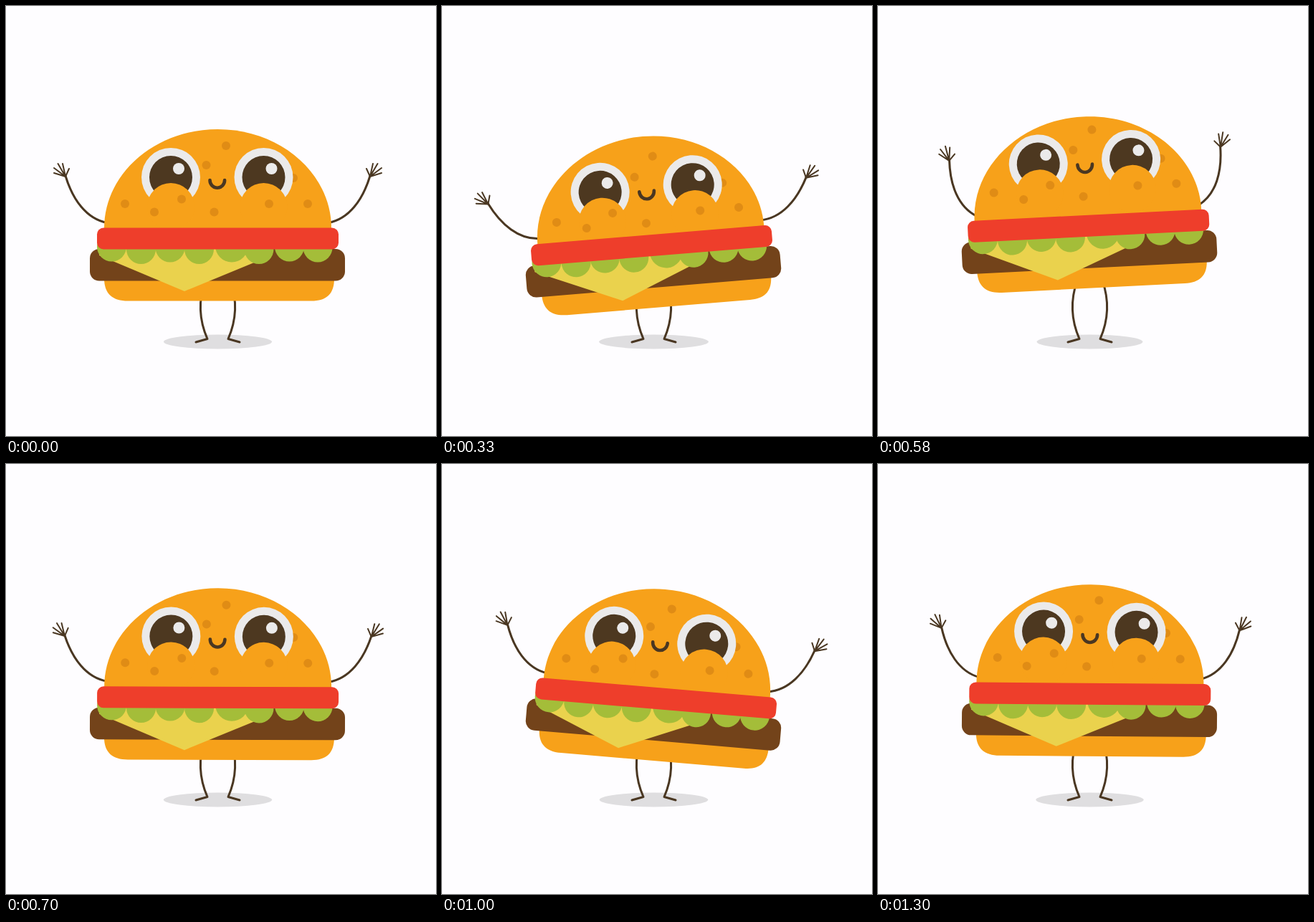
Write an HTML page that moves like this. It is 600 px wide and 600 px high and loops after 1330 ms.

```html
<!DOCTYPE html>
<html lang="en">
<head>
<meta charset="utf-8">
<title>Dancing burger</title>
<style>
  html, body { margin: 0; width: 100%; height: 100%; overflow: hidden; background: #fefdff; }
  svg { display: block; width: 100%; height: 100%; }
  .bun { fill: #f7a11a; }
  .seed { fill: #e08c15; }
  .white { fill: #ebeaea; }
  .dark { fill: #4d3820; }
  .line { fill: none; stroke: #4a3722; stroke-width: 3; stroke-linecap: round; stroke-linejoin: round; }
  .fingers { stroke-width: 2; }
  .lettuce { fill: #a4bd39; }
</style>
</head>
<body>
<svg viewBox="0 0 600 600">
  <defs>
    <g id="limb" class="line">
      <path d="M141 302.5C112 297 93 270 83 237"/>
      <path class="fingers" d="M67 233L83 238L67 226M72.5 220L83 238L79 220M83 238L88 227"/>
    </g>
    <path id="leg" class="line" d="M278 383C268 411 269 437 281 464.5L265 469"/>
    <g id="eye">
      <circle class="white" r="41"/>
      <circle class="dark" r="30"/>
      <circle class="white" cx="11" cy="-12" r="8"/>
      <circle class="bun" cy="41" r="33"/>
    </g>
  </defs>

  <ellipse id="shadow" cx="295.5" cy="468.5" rx="75.5" ry="10" fill="#dfdee0"/>
  <use href="#leg"/>
  <use href="#leg" transform="translate(591) scale(-1 1)"/>

  <g id="body">
    <g id="armL"><use href="#limb"/></g>
    <g transform="translate(591) scale(-1 1)"><g id="armR"><use href="#limb"/></g></g>

    <path class="bun" d="M137 312V310C137 234 208 172 295.5 172S454 234 454 310V312Z"/>
    <g id="face">
      <g class="seed">
        <circle cx="195" cy="240" r="6"/>
        <circle cx="401" cy="240" r="6"/>
      </g>
      <use href="#eye" x="230" y="239"/>
      <use href="#eye" x="359.5" y="239"/>
      <g class="seed">
        <circle cx="307" cy="195" r="6"/>
        <circle cx="279.5" cy="222" r="6"/>
        <circle cx="245" cy="269.5" r="6"/>
        <circle cx="207" cy="287.5" r="6"/>
        <circle cx="166" cy="276" r="6"/>
        <circle cx="290.5" cy="287.5" r="6"/>
        <circle cx="367" cy="276" r="6"/>
        <circle cx="421" cy="276" r="6"/>
      </g>
      <path class="line" style="stroke-width:4.6" d="M284.5 243a10.3 10.8 0 0 0 20.6 0"/>
    </g>

    <path class="bun" d="M137 380C137 402 149 411.5 170 411.5H426C447 411.5 458 402 458 380Z"/>
    <rect x="117" y="339" width="356" height="44.5" rx="13" fill="#73431a"/>
    <path fill="#ead24d" d="M130 335V348L249 398L368 349L372 335Z"/>
    <g class="lettuce">
      <circle cx="147.5" cy="336" r="20.5"/>
      <circle cx="188.5" cy="339.5" r="20.5"/>
      <circle cx="229" cy="337" r="20.5"/>
      <circle cx="269.5" cy="339.5" r="20.5"/>
      <circle cx="315" cy="334.5" r="23"/>
      <circle cx="353" cy="339.5" r="20.5"/>
      <circle cx="395.5" cy="336" r="20.5"/>
      <circle cx="435" cy="337" r="20.5"/>
    </g>
    <rect x="127" y="309.5" width="337" height="30" rx="9" fill="#ee3e2b"/>
  </g>
</svg>
<script>
  const LOOP = 1330;
  const BLOCKS = [-210, 120, 460, 790, 1120];
  const [body, face, armL, armR, shadow] =
    ['body', 'face', 'armL', 'armR', 'shadow'].map(id => document.getElementById(id));

  // Ten drawings per block; the first of each is held twice as long.
  function drawing(t) {
    const block = BLOCKS.findLastIndex(start => t >= start);
    const slot = Math.floor((t - BLOCKS[block]) / 30) - 1;
    return block * 10 - 6 + Math.min(9, Math.max(0, slot));
  }

  // Slow start, then a steady pace: one sway holds two bounces.
  const turns = n => Math.max(n / 150, (n - 2) / 37.6);

  // A wave that trails a little behind the beat.
  const wave = (angle, size, lag) => size * Math.sin(angle) + lag * (1 - Math.cos(angle));

  function render(now) {
    const angle = 2 * Math.PI * turns(drawing(now % LOOP));
    const tilt = -4.85 * Math.sin(angle);
    const drop = wave(2 * angle, 19, 0.5);
    const slide = wave(2 * angle, 5.6, 1.6);
    const swing = `rotate(${-1.03 * drop} 138 302)`;
    body.setAttribute('transform', `translate(0 ${drop}) rotate(${tilt} 295 361)`);
    face.setAttribute('transform', `translate(0 ${slide})`);
    armL.setAttribute('transform', swing);
    armR.setAttribute('transform', swing);
    shadow.setAttribute('rx', 75.5 + drop * 0.09);
    requestAnimationFrame(render);
  }
  render(performance.now());
</script>
</body>
</html>
```
